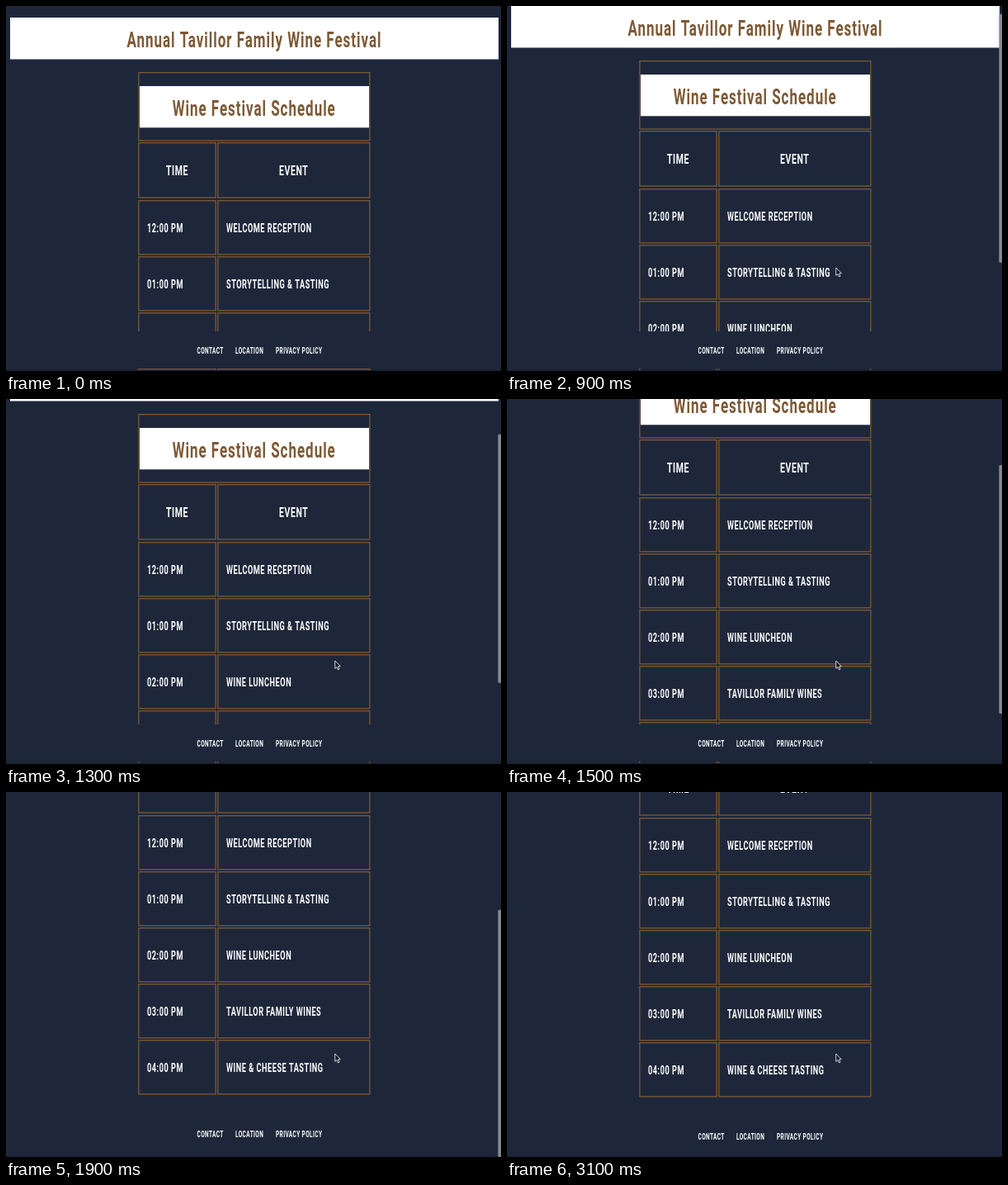
An HTML page with a canvas that plays this animation: 600 px wide and 442 px high, repeating every 4200 ms.

```html
<!DOCTYPE html>
<html lang="en">
<head>
<meta charset="utf-8">
<title>Wine Festival Schedule</title>
<style>
  html, body { margin: 0; width: 600px; height: 442px; overflow: hidden; background: #1e273a; }
  canvas { display: block; }
</style>
</head>
<body>
<canvas id="stage" width="600" height="442"></canvas>
<script>
const ctx = document.getElementById('stage').getContext('2d');
const W = 600, H = 442, LOOP = 4200, STEP = 100;
const NAVY = '#1e273a', BRONZE = '#7d5935', WHITE = '#fff';
const CONDENSE = 0.655, TRACKING = 0.056; // one narrow, slightly spaced face for all text
const MAX_SCROLL = 204;

const EVENTS = [
  ['12:00 PM', 'WELCOME RECEPTION'],
  ['01:00 PM', 'STORYTELLING & TASTING'],
  ['02:00 PM', 'WINE LUNCHEON'],
  ['03:00 PM', 'TAVILLOR FAMILY WINES'],
  ['04:00 PM', 'WINE & CHEESE TASTING']
];
const LINKS = [['CONTACT', 231.5], ['LOCATION', 278], ['PRIVACY POLICY', 327]];

// Scroll offsets per step, starting at SCROLL_START, with a small overshoot.
const SCROLL_START = 800;
const SCROLL = [4, 14, 27, 42, 51, 62, 87, 116, 144, 170, 192, 207, 206, 205, 205, MAX_SCROLL];

function scrollAt(t) {
  const i = Math.floor((t - SCROLL_START) / STEP);
  return i < 0 ? 0 : SCROLL[Math.min(i, SCROLL.length - 1)];
}

function barAlpha(t) {
  if (t < SCROLL_START) return 0;
  const faded = Math.floor((t - 2800) / STEP) / 3;
  return 1 - Math.min(1, Math.max(0, faded));
}

function rect(x, y, w, h, color) {
  ctx.fillStyle = color;
  ctx.fillRect(x, y, w, h);
}

function text(str, x, midY, size, color = WHITE, align = 'left') {
  ctx.save();
  ctx.translate(x, midY + size * 0.355);
  ctx.scale(CONDENSE, 1);
  ctx.font = `600 ${size}px Roboto, sans-serif`;
  ctx.letterSpacing = `${size * TRACKING}px`;
  ctx.textAlign = align;
  ctx.fillStyle = color;
  ctx.fillText(str, 0, 0);
  ctx.restore();
}

function cell(left, top, right, bottom) {
  ctx.strokeStyle = BRONZE;
  ctx.lineWidth = 1.3;
  ctx.strokeRect(left + 0.65, top + 0.65, right - left - 1.3, bottom - top - 1.3);
}

function row(top, bottom) {
  cell(160.2, top, 254.8, bottom);
  cell(256.2, top, 441.5, bottom);
}

function drawPage() {
  rect(5, 14, 592, 50.5, WHITE);
  text('Annual Tavillor Family Wine Festival', 301, 40.3, 26, BRONZE, 'center');

  cell(160.2, 80, 441.5, 163.7);
  rect(162, 97, 278, 50.3, WHITE);
  text('Wine Festival Schedule', 300.7, 123.3, 26, BRONZE, 'center');

  row(165, 232.7);
  text('TIME', 207.4, 199.5, 16, WHITE, 'center');
  text('EVENT', 348.7, 199.5, 16, WHITE, 'center');

  EVENTS.forEach(([time, name], i) => {
    const top = 235.1 + i * 68;
    row(top, top + 66.4);
    text(time, 171, top + 33.6, 14);
    text(name, 267, top + 33.6, 14);
  });
}

function drawFooter(lift) {
  rect(0, 394 - lift, W, 45, NAVY);
  for (const [label, x] of LINKS) text(label, x, 417.2 - lift, 10);
}

function drawScrollbar(scroll, alpha) {
  const top = scroll * 0.69;
  ctx.globalAlpha = alpha;
  ctx.fillStyle = '#858991';
  ctx.beginPath();
  ctx.roundRect(596.4, top, 5, Math.min(301, H - top), 1.5);
  ctx.fill();
  ctx.globalAlpha = 1;
}

function drawCursor(x, y) {
  const points = [[0, 0], [0, 9.4], [2.1, 7.5], [3.6, 10.8], [5.2, 10.1], [3.7, 6.9], [6.5, 6.7]];
  ctx.beginPath();
  for (const [px, py] of points) ctx.lineTo(x + px, y + py);
  ctx.closePath();
  ctx.fillStyle = '#10151f';
  ctx.fill();
  ctx.strokeStyle = '#e8eaee';
  ctx.lineWidth = 0.9;
  ctx.stroke();
}

function render(t) {
  const scroll = scrollAt(t);
  rect(0, 0, W, H, NAVY);
  ctx.save();
  ctx.translate(0, -scroll);
  drawPage();
  ctx.restore();
  drawFooter(Math.max(0, scroll - MAX_SCROLL));
  rect(0, 441, W, 1, '#192131');
  drawScrollbar(scroll, barAlpha(t));
  if (t >= 500) drawCursor(398.8, 317);
  else if (t >= 300) drawCursor(465, 396.5);
}

const start = performance.now();
function tick() {
  render((performance.now() - start) % LOOP);
  requestAnimationFrame(tick);
}
tick();
</script>
</body>
</html>
```
